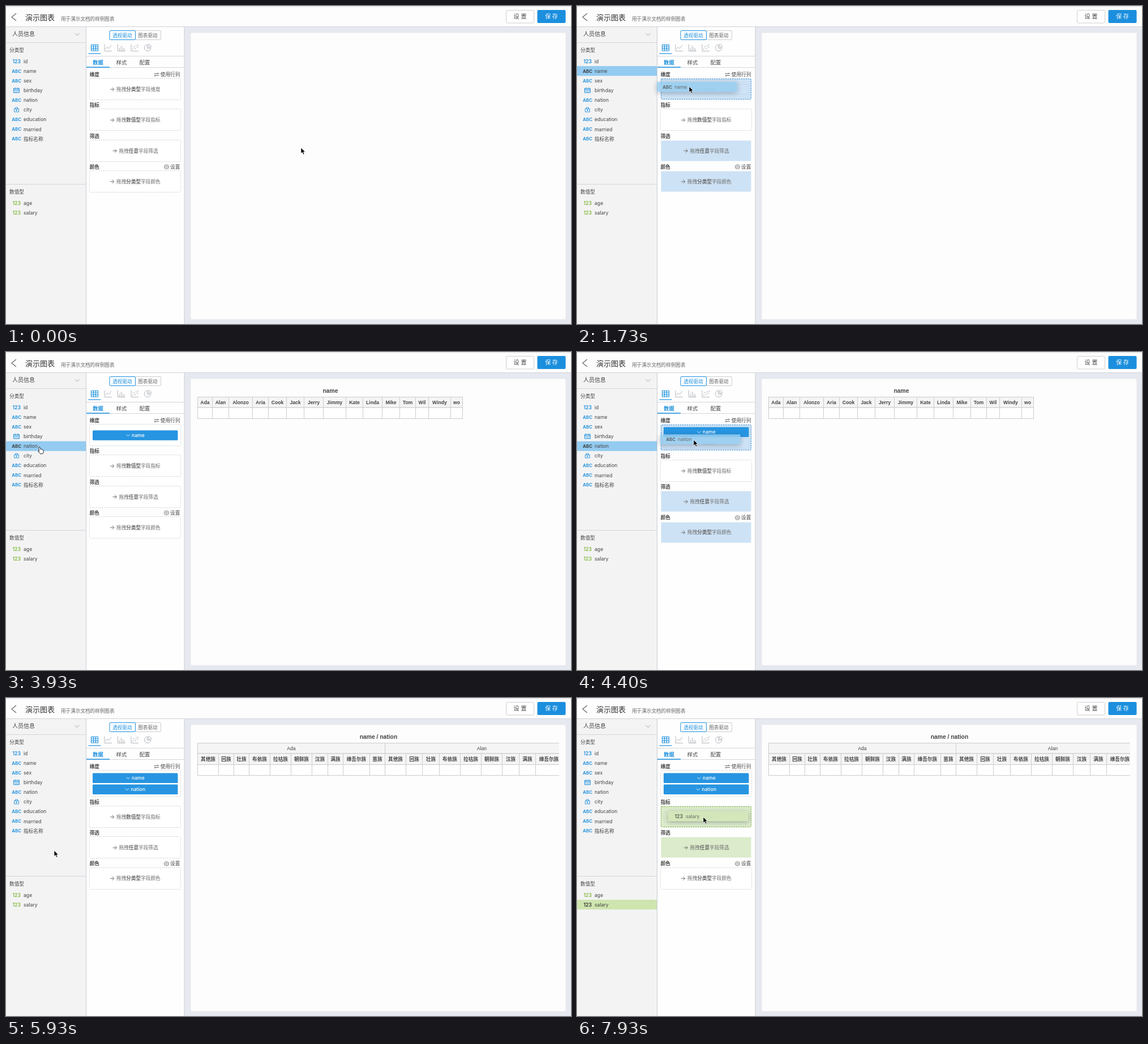
Animation, 998 px wide and 561 px high, one loop 8 s. Source, as an HTML page:

```html
<!DOCTYPE html>
<html lang="zh-CN">
<head>
<meta charset="utf-8">
<title>演示图表</title>
<style>
  html, body { margin: 0; width: 100%; height: 100%; overflow: hidden; background: #fff; }
  svg { display: block; width: 998px; height: 561px; }
  text { font-family: Inter, "Noto Sans CJK SC", "Noto Sans CJK", sans-serif; white-space: pre; }
  .table text { font-family: "Liberation Sans", "Noto Sans CJK SC", "Noto Sans CJK", sans-serif; }
</style>
</head>
<body>
<svg id="stage" viewBox="0 0 998 561">
  <defs>
    <filter id="shadow" x="-20%" y="-100%" width="140%" height="300%">
      <feDropShadow dx="0" dy="2" stdDeviation="4" flood-color="#234" flood-opacity=".4"/>
    </filter>
    <clipPath id="tableClip"><rect x="338" y="60" width="639" height="90"/></clipPath>
  </defs>
  <g id="fixed"></g>
  <g id="live"></g>
</svg>
<script>
const LOOP = 8000, BLUE = '#1b8fde', GREEN = '#82b93c', INK = '#444', GREY = '#b4b8bd', SIZE = 8.65;

// Drawing helpers; text is placed by its vertical centre.
const text = (x, y, s, { size = SIZE, fill = INK, weight = 400, anchor = 'start' } = {}) =>
  `<text x="${x}" y="${y + size * .36}" font-size="${size}" fill="${fill}" font-weight="${weight}" text-anchor="${anchor}">${s}</text>`;
const rect = (x, y, w, h, fill, extra = '') =>
  `<rect x="${x}" y="${y}" width="${w}" height="${h}" fill="${fill}" ${extra}/>`;
const path = (d, stroke, width = 1, extra = '') =>
  `<path d="${d}" fill="none" stroke="${stroke}" stroke-width="${width}" ${extra}/>`;
const chevron = (x, y, color, r = 3) => path(`M${x - r} ${y - r / 2}l${r} ${r}l${r} ${-r}`, color, .9);

const FIELDS = ['id', 'name', 'sex', 'birthday', 'nation', 'city', 'education', 'married', '指标名称', 'age', 'salary']
  .map((label, i) => ({
    label,
    y: i < 9 ? 97.5 + 17.13 * i : 347.4 + 17.13 * (i - 9),
    numeric: i > 8,
    kind: i === 0 || i > 8 ? '123' : label === 'birthday' ? 'date' : label === 'city' ? 'place' : 'ABC'
  }));
const [NAME, NATION, SALARY] = [1, 4, 10];

const ZONES = [
  { label: '维度', hint: ['拖拽', '分类型', '字段维度'], x: 195, numeric: false, discrete: true },
  { label: '指标', hint: ['拖拽', '数值型', '字段指标'], x: 195, numeric: true, discrete: false },
  { label: '筛选', hint: ['拖拽', '任意', '字段筛选'], x: 199.5, numeric: true, discrete: true },
  { label: '颜色', hint: ['拖拽', '分类型', '字段颜色'], x: 195, numeric: false, discrete: true }
];

const CURSOR = [
  [70, 521, 250], [880, 57, 114], [1200, 57, 114], [1730, 198, 142], [1930, 200, 144],
  [2600, 72, 186], [2800, 71, 187], [3470, 64, 178], [3580, 59, 167], [3950, 59, 167],
  [4400, 206, 155], [5000, 210, 158], [5470, 110, 255], [5660, 110, 255], [5930, 85, 269],
  [6400, 63, 366], [6850, 62, 366], [7270, 157, 306], [7930, 223, 210]
];
const DRAGS = [
  { start: 1200, end: 1900, field: NAME },
  { start: 3950, end: 4830, field: NATION },
  { start: 6850, end: LOOP, field: SALARY }
];
const DROPPED = [[1900, 'name'], [4830, 'nation']];

function cursorAt(t) {
  const i = CURSOR.findIndex(k => k[0] > t);
  if (i < 1) return CURSOR.at(i).slice(1);
  const [t0, x0, y0] = CURSOR[i - 1], [t1, x1, y1] = CURSOR[i];
  const p = (t - t0) / (t1 - t0), e = p * p * (3 - 2 * p);
  return [x0 + (x1 - x0) * e, y0 + (y1 - y0) * e];
}

function fieldIcon(kind, y, color) {
  if (kind === 'date')
    return path(`M13.5 ${y - 3.5}h10v7.5h-10zM13.5 ${y - 1.2}h10M16 ${y - 5}v2.5M21 ${y - 5}v2.5`, color, 1)
      + path(`M15.3 ${y + .6}h7M15.3 ${y + 2.4}h7`, color, .9, 'stroke-dasharray="1.4 1.2"');
  if (kind === 'place')
    return path(`M14.5 ${y - 1.8}h8v5.5h-8zM16.5 ${y - 1.8}v-2.2h4v2.2M17 ${y + .8}h3M18.5 ${y - .6}v2.8`, color, .9);
  return text(18.7, y, kind, { fill: color, weight: 600, size: kind === 'ABC' ? 8 : 8.7, anchor: 'middle' });
}

function field(f, active) {
  const color = active ? '#333' : f.numeric ? GREEN : BLUE;
  return (active ? rect(0, f.y - 8.6, 141, 17.2, f.numeric ? '#cee5af' : '#94cbf0') : '')
    + fieldIcon(f.kind, f.y, color) + text(31, f.y, f.label);
}

function pill(label, y, numeric, ghost) {
  const body = rect(153, y - 8.7, 150.5, 17.4, ghost ? 'none' : '#2795e1',
    ghost ? 'rx="2" stroke="#789" stroke-width=".7" stroke-dasharray="2 1.5"' : 'rx="1.5"');
  const ink = ghost ? '#678' : '#fff';
  const left = label === 'name' ? 222 : 220.5;
  return `<g opacity="${ghost ? .3 : 1}">${body}${chevron(left - 6.5, y, ink)}${text(left, y, label, { fill: ink, weight: 500 })}</g>`;
}

function zones(t, dragged, [cx, cy]) {
  const pills = DROPPED.filter(d => t >= d[0]).map(d => d[1]);
  const overDims = dragged && !dragged.numeric && cx > 148 && cx < 308 && cy > 128 && cy < 166 + (pills.length ? 8 : 0);
  const grow = pills.length + (overDims ? 1 : 0) > 1 ? 8.6 : 0;

  return ZONES.map((z, i) => {
    const shift = i ? grow : 0;
    const top = Math.round(127 + 54.3 * i + shift) + .5, height = 38 + (i ? 0 : grow);
    const mid = 147 + 54.25 * i + shift;
    const accepts = dragged && (dragged.numeric ? z.numeric : z.discrete);
    const over = accepts && cx > 148 && cx < 308 && cy > top && cy < top + height;
    const tint = dragged && dragged.numeric ? '#dcebcb' : '#cde2f5';
    const edge = dragged && dragged.numeric ? '#76a83a' : '#3a8dd0';
    let out = text(147.7, mid - 26, z.label, { weight: 600 });
    out += accepts
      ? rect(148.5, top + 1, 159, height - 2, tint, over ? `rx="1.5" stroke="${edge}" stroke-dasharray="2.5 1.5"` : '')
      : rect(147.5, top, 161, height, '#fff', 'rx="2" stroke="#ccc" stroke-dasharray="2 1.6" stroke-width=".9"');

    const items = (i ? [] : pills).map(label => ({ label, ghost: false }));
    if (over) items.push({ label: dragged.label, ghost: true });
    if (items.length)
      out += items.map((p, n) => pill(p.label, items.length > 1 ? 141.3 + 19.9 * n : mid, false, p.ghost)).join('');
    else
      out += path(`M${z.x - 11} ${mid}h7M${z.x - 7.5} ${mid - 3.2}l3.4 3.2l-3.4 3.2`, '#666', .9)
        + text(z.x, mid, `${z.hint[0]}<tspan font-weight="600">${z.hint[1]}</tspan>${z.hint[2]}`, { fill: '#6b6b6b' });

    if (i === 0) out += path(`M261.5 ${mid - 27.5}h8l-2 -2M270 ${mid - 24.5}h-8l2 2`, '#555', .9) + text(272.8, mid - 26, '使用行列');
    if (i === 3) {
      const y = mid - 26;
      out += path(`M283.5 ${y - 4}l3.7 2v4l-3.7 2l-3.7 -2v-4z`, '#666', .9, 'stroke-linejoin="round"')
        + `<circle cx="283.5" cy="${y}" r="1.5" fill="none" stroke="#666" stroke-width=".8"/>` + text(290, y, '设置');
    }
    return out;
  }).join('');
}

// A row of cells laid out from a left edge and a list of widths.
function cells(x, y, h, widths, labels, header, weight = 600) {
  return widths.map((w, i) => {
    const cell = rect(x, y, w, h, header ? '#f5f5f6' : '#fff', 'stroke="#ccc"')
      + (labels ? text(x + w / 2, y + h / 2, labels[i], { weight, anchor: 'middle' }) : '');
    x += w;
    return cell;
  }).join('');
}

const PEOPLE = 'Ada Alan Alonzo Aria Cook Jack Jerry Jimmy Kate Linda Mike Tom Wil Windy wo'.split(' ');
const PEOPLE_W = [26, 29, 42, 28, 32, 31, 34, 40, 30, 34, 31, 28, 23, 39, 21];
const GROUPS = '其他族 回族 壮族 布依族 拉祜族 朝鲜族 汉族 满族 维吾尔族'.split(' ');
const GROUPS_W = [37, 27, 27, 37, 37, 37, 28, 27, 47, 27, 37, 29, 30, 37, 37, 37, 30, 29, 47];

function table(t) {
  if (t < 2150) return '';
  const title = (x, s) => text(x, 68.5, s, { size: 10.3, weight: 700, anchor: 'middle' });
  const body = t < 5200
    ? title(573, 'name') + cells(338.5, 79.5, 18.5, PEOPLE_W, PEOPLE, true) + cells(338.5, 98, 19.5, PEOPLE_W)
    : title(658, 'name / nation')
      + cells(338.5, 79.5, 18.5, [331, 342], ['Ada', 'Alan'], true, 500)
      + cells(338.5, 98, 19.5, GROUPS_W, [...GROUPS, '苗族', ...GROUPS], true)
      + cells(338.5, 117.5, 19, GROUPS_W);
  return `<g class="table" clip-path="url(#tableClip)">${body}</g>`;
}

function pointer(x, y, hand) {
  const shape = hand
    ? 'M-1.2 1.2q1.2 -1.6 2.2 0l1.2 3.4q1 -.8 1.6 .3q1 -.6 1.6 .5q1.2 -.3 1.4 1l.5 2.6q.1 1.4 -.9 3l-4.6 .8q-1.2 -2 -4 -4q-.4 -1.4 1.8 -.6z'
    : 'M0 0v10.2l2.4 -2.1l1.7 3.9l1.9 -.8l-1.7 -3.8h3.2z';
  return `<path transform="translate(${x.toFixed(2)} ${y.toFixed(2)})" d="${shape}" fill="${hand ? '#fff' : '#000'}" stroke="${hand ? '#111' : '#fff'}" stroke-width="${hand ? .9 : .7}" stroke-linejoin="round"/>`;
}

function dragImage(f, dx, dy) {
  const color = f.numeric ? '#d3e7b8' : '#98cdf0';
  return `<g transform="translate(${dx.toFixed(2)} ${dy.toFixed(2)})" opacity=".85">`
    + rect(0, f.y - 8.6, 141.5, 17.2, color, 'filter="url(#shadow)"')
    + fieldIcon(f.kind, f.y, '#444') + text(31, f.y, f.label, { fill: '#555' }) + '</g>';
}

function fixedParts() {
  const grey = d => path(d, GREY, 1);
  return [
    rect(0, 0, 998, 561, '#e7e9f0'),
    rect(326, 47, 663, 506, '#fdfdfe', 'stroke="#dcdee5" stroke-width=".6"'),
    rect(0, 0, 998, 37, '#fdfdfd'),
    path('M0 1h998', '#dcdce0', 1),
    rect(0, 37, 141, 524, '#f3f3f4'),
    rect(142, 37, 173, 524, '#fefefe'),
    path('M0 36.5h998', '#cfd2d8'),
    path('M141.5 37v524M315 37v524', '#c9ccd2'),
    path('M0 64.5h141M0 314.5h141M142 88.5h173M142 108.5h173', '#d4d6da'),

    path('M18 13l-8 6.5l8 6.5', '#666', 1.2),
    text(34, 20, '演示图表', { size: 13, fill: '#333' }),
    text(97, 22.5, '用于演示文档的样例图表', { size: 8.6, fill: '#666' }),
    rect(883.5, 7.5, 49, 22.5, '#fff', 'rx="2" stroke="#d0d0d3"'),
    rect(938.5, 7, 50, 23, BLUE, 'rx="2"'),
    text(908, 18.7, '设 置', { size: 10, anchor: 'middle' }),
    text(963.5, 18.7, '保 存', { size: 10, fill: '#fff', weight: 500, anchor: 'middle' }),

    text(11, 49.5, '人员信息', { size: 10 }),
    chevron(125.5, 50, '#999', 4),
    text(6, 78, '分类型'),
    text(6, 328, '数值型'),

    rect(228.5, 43.5, 45, 16, '#fff', 'rx="1.5" stroke="#ccc"'),
    rect(183, 43.5, 45.5, 16, '#fff', `rx="1.5" stroke="${BLUE}"`),
    text(205.5, 51.5, '透视驱动', { fill: BLUE, weight: 500, anchor: 'middle' }),
    text(250.5, 51.5, '图表驱动', { fill: '#666', anchor: 'middle' }),

    path('M150.5 68.5h12v10.5h-12zM150.5 72h12M150.5 75.5h12M154.5 68.5v10.5M158.5 68.5v10.5', BLUE, 1.1),
    path('M145.5 84h22', BLUE, 1.2),
    grey('M174 67.5v12h13M175.5 76l3 -3.5l3 2.5l4.5 -6'),
    grey('M197.5 67.5v12h13M200.5 79v-5M203.5 79v-9M206.5 79v-6M209.2 79v-4'),
    grey('M221 67.5v12h13'),
    [[224, 76], [226, 72], [228.5, 75], [230, 70.5], [232.5, 73], [233, 69]]
      .map(([x, y]) => `<circle cx="${x}" cy="${y}" r=".9" fill="${GREY}"/>`).join(''),
    grey('M249.5 68a5.8 5.8 0 1 0 6.5 6.5h-6.5zM251.5 67.5a5.5 5.5 0 0 1 5 5h-5z'),

    text(162.5, 99.5, '数据', { size: 9.3, fill: BLUE, weight: 600, anchor: 'middle' }),
    text(204, 99.5, '样式', { size: 9.3, anchor: 'middle' }),
    text(245, 99.5, '配置', { size: 9.3, anchor: 'middle' }),
    path('M142 108h41', BLUE, 1.4)
  ].join('');
}

function liveParts(t) {
  const cursor = cursorAt(t), [x, y] = cursor;
  const drag = DRAGS.find(d => t >= d.start && t < d.end);
  const hovered = x < 141 ? FIELDS.findIndex(f => Math.abs(f.y - y) < 8.57) : -1;
  const active = drag ? drag.field : hovered;
  const dragged = drag && FIELDS[drag.field];
  let out = FIELDS.map((f, i) => field(f, i === active)).join('') + zones(t, dragged, cursor) + table(t);
  if (drag) {
    const [x0, y0] = cursorAt(drag.start);
    out += dragImage(dragged, x - x0, y - y0);
  }
  return out + pointer(x, y, !drag && hovered >= 0);
}

document.getElementById('fixed').innerHTML = fixedParts();
const live = document.getElementById('live');
let shown = '';
function frame() {
  const next = liveParts(performance.now() % LOOP);
  if (next !== shown) live.innerHTML = shown = next;
  requestAnimationFrame(frame);
}
frame();
</script>
</body>
</html>
```
